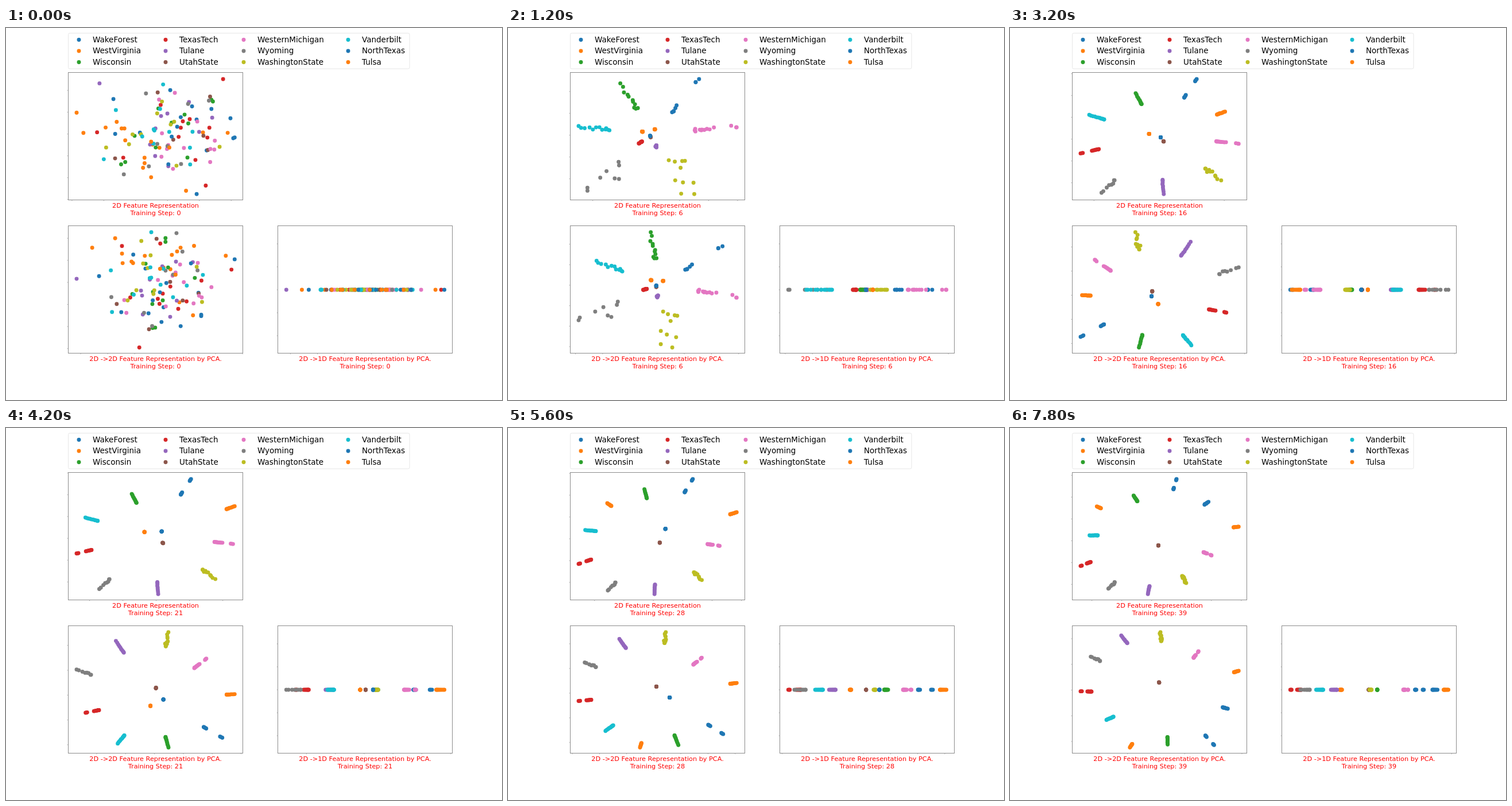
These frames come from a looping animation (864 by 648 pixels, 8 s). An HTML page:

```html
<!DOCTYPE html>
<html lang="en">
<head>
<meta charset="utf-8">
<title>Feature representation during training</title>
<style>
html, body { margin: 0; width: 100%; height: 100%; overflow: hidden; background: #fff; }
svg { display: block; width: 100vw; height: 100vh; font-family: "DejaVu Sans", sans-serif; }
.legend { font-size: 13.5px; }
.title { font-size: 11.25px; fill: #f00; text-anchor: middle; }
.frame { fill: none; stroke: #8c8c8c; stroke-width: 1; }
.ticks { fill: none; stroke: #999; stroke-width: .7; }
</style>
</head>
<body>
<svg viewBox="0 0 864 648"></svg>
<script>
const svg = document.querySelector('svg');
const COLORS = ['#1f77b4', '#ff7f0e', '#2ca02c', '#d62728', '#9467bd',
  '#8c564b', '#e377c2', '#7f7f7f', '#bcbd22', '#17becf'];
const W = 304, H = 222, R = 3.45, STEP_MS = 200, STEPS = 40;
const UNIT = 38, MID = [258, 190];

// View of the data: step, PCA angle, unit aspect, sign of each component
const VIEWS = [
  [0, 50.4, .685, 1, -1],
  [6, -18.7, .753, 1, 1],
  [10, -30, .778, -1, -1],
  [16, -31.9, .67, -1, -1],
  [21, -32.8, .655, 1, -1],
  [28, -30.9, .742, 1, -1],
  [39, -27, .73, 1, -1]
];

const mix = (a, b, p) => a + (b - a) * p;
const clamp = (v, lo, hi) => Math.min(hi, Math.max(lo, v));
const mean = list => list.reduce((sum, v) => sum + v, 0) / list.length;

let seed = 11;
function rand() {
  seed = (seed * 16807) % 2147483647;
  return seed / 2147483647;
}
const bell = () => rand() + rand() - 1;

function add(tag, attrs, text) {
  const el = document.createElementNS(svg.namespaceURI, tag);
  for (const k in attrs) el.setAttribute(k, attrs[k]);
  if (text) el.textContent = text;
  return svg.appendChild(el);
}

add('rect', { x: 108.5, y: 9, width: 594.5, height: 62, rx: 2.5, fill: '#fff', stroke: '#e6e6e6' });

// path: cluster centre at each view after the first.
// spread: relative line length, gap: free part behind the outer points, loose: scatter in px.
const points = [];
let classes = 0;
function group(name, count, path, { spread = 1, gap = 0, loose = 2.5 } = {}) {
  const id = classes++, color = COLORS[id % 10];
  const x = [127, 278, 414, 596][Math.floor(id / 3)], y = 20.3 + id % 3 * 19.5;
  add('circle', { cx: x, cy: y + .2, r: R, fill: color });
  add('text', { x: x + 24, y: y + 4.4, class: 'legend' }, name);
  for (let i = 0; i < count; i++) {
    const fill = 1 - (1 - i / (count - 1)) ** 1.5;
    const along = gap && i < 3 ? i * .06 : mix(gap, 1, fill);
    points.push({
      color, path, spread, loose, along: .5 - along,
      start: [MID[0] + bell() * 150, MID[1] + bell() * 110],
      sway: [bell() * 1.6, bell() * 1.6]
    });
  }
}

group('WakeForest', 8, [[311, 124], [325, 106], [313, 108], [314, 106], [314, 101], [285, 105]], { spread: 1.2, gap: .7 });
group('WestVirginia', 9, [[239, 186], [237, 180], [242, 187], [242, 184], [174, 134], [152, 144]], { spread: .4 });
group('Wisconsin', 11, [[216, 126], [203, 108], [224, 126], [224, 126], [238, 115], [216, 129]]);
group('TexasTech', 12, [[236, 204], [213, 209], [140, 217], [137, 218], [131, 233], [129, 239]], { spread: .8, gap: .4 });
group('Tulane', 10, [[262, 211], [246, 251], [266, 279], [265, 281], [254, 281], [239, 283]], { spread: .85 });
group('UtahState', 6, [[253, 195], [257, 188], [267, 200], [274, 203], [263, 200], [256, 208]]);
group('WesternMichigan', 13, [[362, 181], [368, 182], [377, 202], [380, 203], [358, 204], [342, 222]], { gap: .35 });
group('Wyoming', 8, [[171, 261], [154, 276], [171, 278], [172, 274], [178, 276], [174, 275]], { spread: .75, loose: 14 });
group('WashingtonState', 10, [[305, 262], [327, 269], [352, 257], [354, 257], [330, 258], [301, 265]], { spread: .85, loose: 20 });
group('Vanderbilt', 12, [[158, 180], [142, 179], [152, 158], [150, 162], [141, 179], [143, 191]], { spread: .75 });
group('NorthTexas', 8, [[252, 193], [255, 185], [262, 193], [272, 183], [273, 176], [340, 137]], { spread: .5 });
group('Tulsa', 9, [[260, 182], [273, 175], [366, 151], [392, 142], [393, 149], [392, 177]], { spread: .4 });

// Each cluster is a line pointing away from the middle that tightens with training.
function place(pt, k, p, step) {
  const from = pt.path[Math.max(k - 1, 0)], to = pt.path[k];
  const age = Math.max(step, 6);
  const c = [0, 1].map(a => mix(from[a], to[a], p));
  const dx = c[0] - MID[0], dy = c[1] - MID[1], r = Math.hypot(dx, dy);
  const near = Math.min(1, r / 80);
  const reach = 2.6 / age ** .75 * near * pt.spread * pt.along;
  const slack = pt.loose * near * clamp((17 - age) / 7, .08, 1);
  const goal = [c[0] + dx * reach + pt.sway[0] * slack, c[1] + dy * reach + pt.sway[1] * slack];
  return k ? goal : goal.map((v, a) => mix(pt.start[a], v, p));
}

function panel(x, y, title) {
  const ticks = add('path', { class: 'ticks' });
  const dots = points.map(p => add('circle', { r: R, fill: p.color }));
  add('rect', { x, y, width: W, height: H, class: 'frame' });
  add('text', { x: x + W / 2, y: y + 235.7, class: 'title' }, title);
  const label = add('text', { x: x + W / 2, y: y + 248.2, class: 'title' });
  return { x, y, ticks, dots, label };
}
const raw = panel(108.5, 77.5, '2D Feature Representation');
const pca2 = panel(108.5, 344.5, '2D ->2D Feature Representation by PCA.');
const pca1 = panel(473.5, 344.5, '2D ->1D Feature Representation by PCA.');

// Linear map of values onto lo..hi, as autoscaled axes do
function fit(values, lo, hi) {
  const min = Math.min(...values), scale = (hi - lo) / (Math.max(...values) - min);
  const map = v => lo + (v - min) * scale;
  return { scale, out: values.map(map), zero: map(mean(values)) };
}

function marks(origin, step, from, span) {
  while (step < span / 9) step *= 2;
  while (step / 2 >= span / 9) step /= 2;
  const list = [];
  for (let v = origin - Math.floor((origin - from) / step) * step; v <= from + span; v += step) list.push(v);
  return list;
}

function show(p, xs, ys, tx, ux, ty, uy, step) {
  p.dots.forEach((dot, i) => {
    dot.setAttribute('cx', xs[i].toFixed(2));
    dot.setAttribute('cy', ys[i].toFixed(2));
  });
  p.ticks.setAttribute('d',
    marks(tx, ux, p.x, W).map(v => `M${v.toFixed(1)} ${p.y + H}v2`).join('') +
    marks(ty, uy, p.y, H).map(v => `M${p.x} ${v.toFixed(1)}h-2`).join(''));
  p.label.textContent = 'Training Step: ' + step;
}

function draw(step) {
  let k = 0;
  while (k < VIEWS.length - 2 && step >= VIEWS[k + 1][0]) k++;
  const a = VIEWS[k], b = VIEWS[k + 1];
  const q = (step - a[0]) / (b[0] - a[0]);
  const p = k ? q : 1 - (1 - q) ** 1.5;
  const angle = mix(a[1], b[1], p) * Math.PI / 180, aspect = mix(a[2], b[2], p);
  const [, , , signU, signV] = q < .5 ? a : b;

  const spots = points.map(pt => place(pt, k, p, step));
  const fx = fit(spots.map(s => s[0]), 123, 398.3), fy = fit(spots.map(s => s[1]), 89, 289.3);
  const xs = fx.out, ys = fy.out;
  show(raw, xs, ys, fx.zero, UNIT / aspect, fy.zero, UNIT, step);

  const c = Math.cos(angle), s = Math.sin(angle);
  const fu = fit(xs.map((x, i) => signU * (aspect * c * x + s * ys[i])), 123, 398.3);
  const fv = fit(xs.map((x, i) => signV * (c * ys[i] - aspect * s * x)), 355.7, 556.5);
  const du = UNIT * fu.scale, shift = pca1.x - pca2.x + .3;
  show(pca2, fu.out, fv.out, fu.zero, du, fv.zero, UNIT * fv.scale, step);
  show(pca1, fu.out.map(u => u + shift), xs.map(() => 456), fu.zero + shift, du, 456, 40, step);
}

let last = -1;
const begin = performance.now();
function tick() {
  const step = Math.floor((performance.now() - begin) / STEP_MS) % STEPS;
  if (step !== last) draw(last = step);
  requestAnimationFrame(tick);
}
tick();
</script>
</body>
</html>
```
